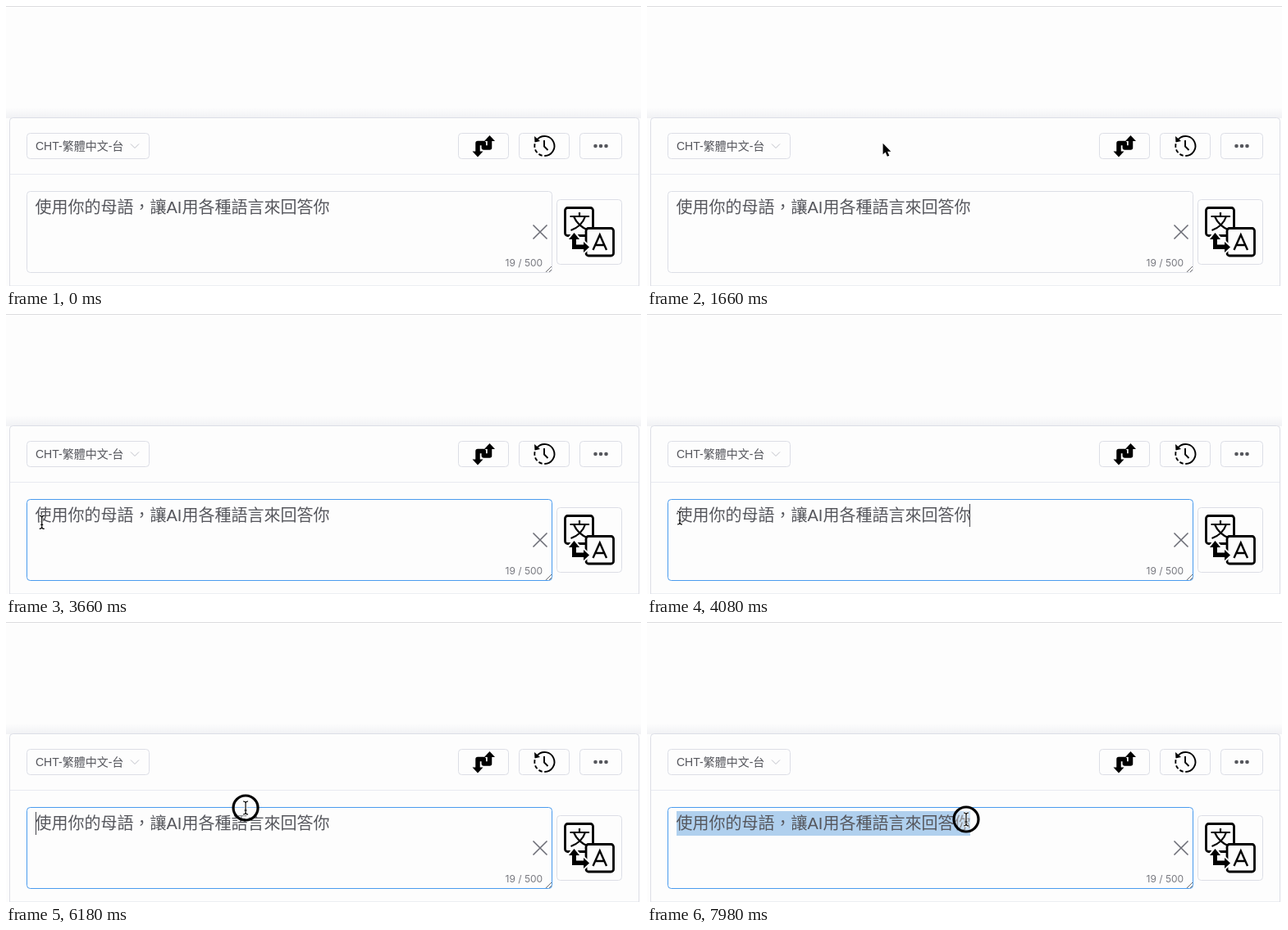
An HTML page that plays this animation: 774 px wide and 342 px high, repeating every 8000 ms.

```html
<!DOCTYPE html>
<html lang="zh-Hant">
<head>
<meta charset="utf-8">
<style>
  html, body { margin: 0; width: 100%; height: 100%; overflow: hidden; background: #fdfdfd; }
  svg { display: block; width: 774px; height: 342px; }
  text { font-family: "Liberation Sans", "Noto Sans CJK TC", sans-serif; fill: #55565c; }
  .box { fill: none; stroke: #dcdee6; }
  .ink { fill: none; stroke: #000; }
  .halo { stroke: #fdfdfd; stroke-width: 1.5; paint-order: stroke; }
</style>
</head>
<body>
<svg viewBox="0 0 774 342">
  <defs>
    <linearGradient id="shade" x2="0" y2="1">
      <stop offset="0" stop-color="#d4d6e0" stop-opacity="0"/>
      <stop offset="1" stop-color="#d4d6e0" stop-opacity=".3"/>
    </linearGradient>
  </defs>

  <!-- panel -->
  <path d="M0 .5H774" stroke="#dcdcdf"/>
  <path d="M0 124H774V137H0Z" fill="url(#shade)"/>
  <rect class="box" x="4.5" y="136.5" width="767" height="230" rx="4" style="fill:#fdfdfd"/>
  <path class="box" d="M5 205.5H771" style="stroke:#e8eaf0"/>
  <path class="box" d="M5 341.5H771" style="stroke:#eceef2"/>

  <!-- header controls -->
  <rect class="box" x="25.5" y="155.5" width="149" height="31" rx="4"/>
  <text x="36" y="176" font-size="14">CHT-繁體中文-台</text>
  <path d="M152 168.5L157 173.5L162 168.5" fill="none" stroke="#bfc1c9"/>
  <rect class="box" x="551.5" y="155.5" width="61" height="31" rx="4"/>
  <rect class="box" x="625.5" y="155.5" width="61" height="31" rx="4"/>
  <rect class="box" x="699.5" y="155.5" width="51" height="31" rx="4"/>

  <path class="ink" d="M575 178V167.5H582.3V173H589.5V164" stroke-width="5.5" stroke-linejoin="round"/>
  <path d="M589.5 158L596 165H583ZM575 184.5L568.5 177.5H581.5Z"/>

  <g class="ink" stroke-width="1.9">
    <path d="M647.5 163A12 12 0 1 1 656.5 183"/>
    <path d="M656.5 183A12 12 0 0 1 644.8 167.5" stroke-dasharray="4.5 2.5" stroke-dashoffset="-3"/>
    <path d="M656 164V171.5L660.5 176"/>
  </g>
  <path d="M644 159L644.5 166.5L651 165Z"/>
  <g fill="#55565c">
    <circle cx="718.5" cy="171" r="2.3"/><circle cx="725" cy="171" r="2.3"/><circle cx="731.5" cy="171" r="2.3"/>
  </g>

  <!-- text area -->
  <rect id="area" class="box" x="25.5" y="226.5" width="640" height="99" rx="4"/>
  <rect id="sel" x="36" y="231" height="30" fill="#b0d0ee"/>
  <text x="35.5" y="253" font-size="20">使用你的母語，讓AI用各種語言來回答你</text>
  <path id="caret" d="M0 232V260" stroke="#44444a"/>
  <path d="M642.5 267.5L659.5 284.5M659.5 267.5L642.5 284.5" stroke="#6c6d76" stroke-width="1.6"/>
  <text x="608.5" y="318" font-size="12" style="font-family:Inter,sans-serif;fill:#77787f">19 / 500</text>
  <path d="M658 325L665 318M662 325L665 322" stroke="#6c6c70"/>

  <!-- translate button -->
  <rect class="box" x="671.5" y="236.5" width="79" height="79" rx="4"/>
  <g class="ink" stroke-width="2.8">
    <rect x="681.5" y="246.5" width="34" height="34" rx="3"/>
    <path d="M687.5 257H711M699 252V257M706 257Q702 269 688.5 274M692 257Q697 269 710 274" stroke-width="2.2"/>
    <rect x="707" y="271.5" width="33.5" height="33.5" rx="3" fill="#fdfdfd"/>
    <path d="M715.5 298L723.8 279.5L732 298M718.5 292H729" stroke-width="2.4"/>
  </g>
  <path class="halo" style="stroke-width:4" d="M692.5 277L699 285H695V291.5H704V288L711 294.5L704 301V297H690V285H686Z"/>

  <!-- pointer -->
  <g id="pointer">
    <circle id="ring" r="15" fill="#fdfdfd" fill-opacity=".35" stroke="#000" stroke-width="3.2"/>
    <path id="arrow" class="halo" d="M0 -.5V13.1L3 10.3L5.3 15.5L7.7 14.5L5.5 9.5H9.7Z"/>
    <g id="beam" fill="none">
      <path d="M-3 -8Q0 -8 0 -5.5Q0 -8 3 -8M0 -6V6M-3 8Q0 8 0 5.5Q0 8 3 8" stroke="#fdfdfd" stroke-width="3"/>
      <path d="M-3 -8Q0 -8 0 -5.5Q0 -8 3 -8M0 -6V6M-3 8Q0 8 0 5.5Q0 8 3 8M-1.5 3H1.5" stroke="#000" stroke-width="1.2"/>
    </g>
  </g>
</svg>
<script>
  const LOOP = 8000, ENTER = 1400, CLICK = 3000, RELEASE = 3150, DRAG = 4500;
  const TEXT_START = 36, TEXT_END = 393.5, TAIL = 215, GLYPH = 20, LINE_TOP = 238;
  // time, x, y of the pointer
  const track = [
    [1400, 400, -18], [1560, 337, 102], [1660, 288, 168], [1900, 190, 214], [2400, 97, 246],
    [2680, 79, 251], [2950, 62, 280], [3250, 62, 280], [3700, 42, 252], [4080, 40, 249],
    [4500, 38, 244], [4650, 40, 244], [4900, 44, 231], [5500, 155, 227], [6180, 292, 227],
    [6980, 343, 228], [7140, 345, 229], [7400, 361, 232], [7980, 389, 241], [8000, 389, 241]
  ];
  const $ = id => document.getElementById(id);
  const show = (id, on) => $(id).style.display = on ? "" : "none";

  function pointerAt(t) {
    const i = Math.max(1, track.findIndex(p => p[0] >= t));
    const [t0, x0, y0] = track[i - 1], [t1, x1, y1] = track[i];
    const k = Math.max(0, (t - t0) / (t1 - t0));
    return [x0 + (x1 - x0) * k, y0 + (y1 - y0) * k];
  }

  function draw(t) {
    const [x, y] = pointerAt(t);
    const focus = t >= CLICK, drag = t >= DRAG;
    const selected = drag && x > TAIL && y > LINE_TOP;

    show("pointer", t >= ENTER);
    $("pointer").setAttribute("transform", `translate(${x} ${y})`);
    show("arrow", !focus);
    show("beam", focus);
    show("ring", drag || (focus && t < RELEASE));

    $("area").style.stroke = focus ? "#4a9bee" : "";
    show("caret", focus && !selected && (drag || (t - CLICK) % 1000 < 500));
    $("caret").setAttribute("transform", `translate(${drag ? TEXT_START + .5 : TEXT_END})`);

    show("sel", selected);
    const end = Math.min(394, TAIL + GLYPH * Math.round((x - TAIL) / GLYPH));
    $("sel").setAttribute("width", Math.max(0, end - TEXT_START));
  }

  const start = performance.now();
  function tick() {
    draw((performance.now() - start) % LOOP);
    requestAnimationFrame(tick);
  }
  tick();
</script>
</body>
</html>
```
